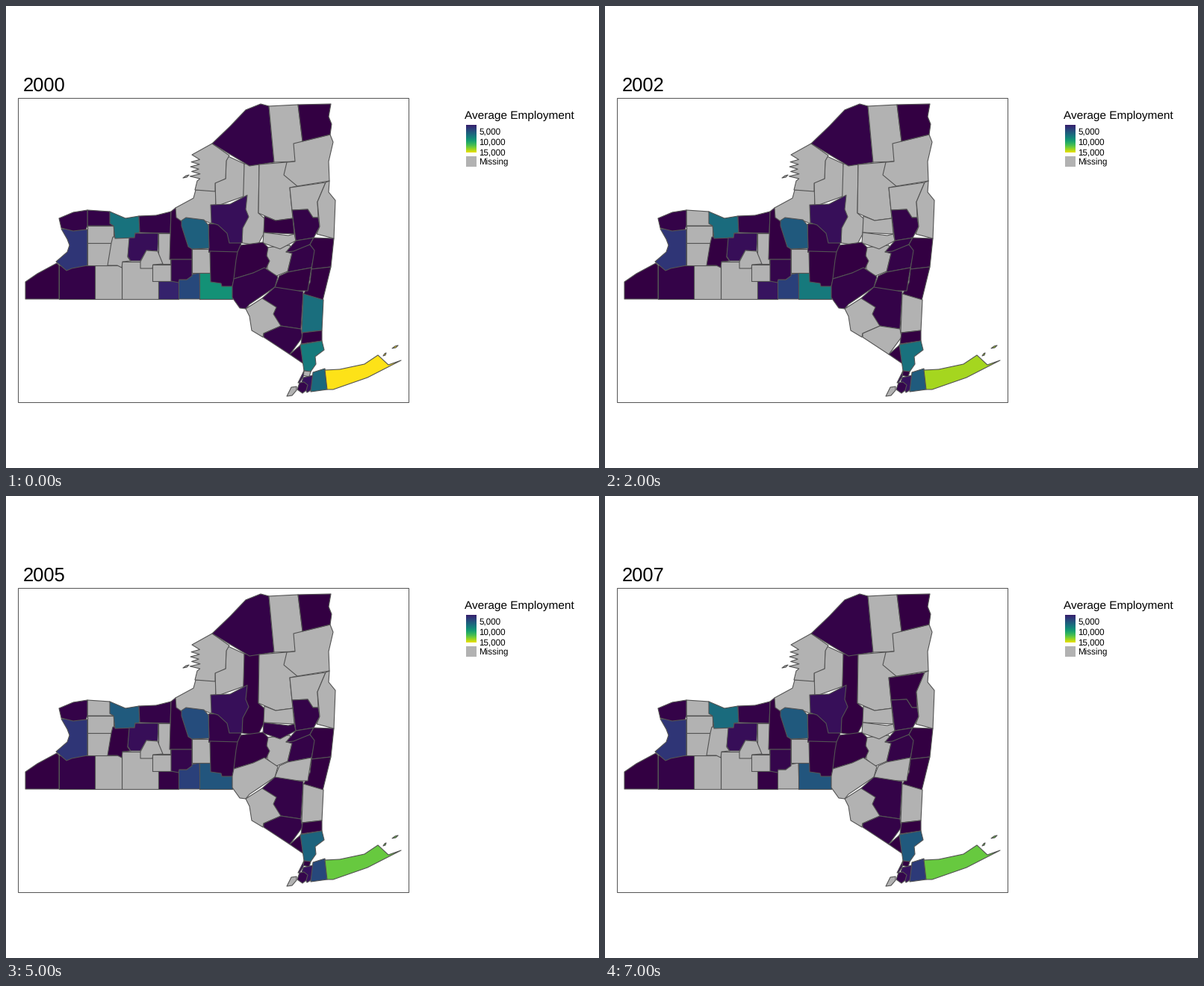
Recreate the animation shown at these times as a matplotlib script. Size 794 by 618 pixels, loop 8000 ms.

```python
import numpy as np
import matplotlib
import matplotlib.pyplot as plt
from matplotlib.animation import FuncAnimation
from matplotlib.patches import Polygon, Rectangle

W, H, DPI = 794, 618, 100
PX = 72 / DPI
YEARS = np.arange(2000, 2008)
MISSING, BORDER = "#b2b2b2", "#535353"
LOWEST, LOW = 0, .018

plt.rcParams["font.family"] = ["Liberation Sans", "DejaVu Sans"]
plt.rcParams["text.hinting"] = "none"

fig = plt.figure(figsize=(W / DPI, H / DPI), dpi=DPI, facecolor="white")
ax = fig.add_axes([0, 0, 1, 1])
ax.axis("off")

viridis = matplotlib.colormaps["viridis"]
rng = np.random.default_rng(4)
counties = []


def shade(t):
    """Viridis, slightly darkened; None means no data."""
    return MISSING if t is None else tuple(np.array(viridis(float(t))[:3]) ** 1.22)


def drift(a, b, first=2000, last=2007):
    """Level that moves evenly from a to b between two years."""
    return np.interp(YEARS, [first, last], [a, b])


def dip(mid, swing):
    """Level that sinks to its lowest in the middle of 2004 and recovers."""
    return mid + swing * np.cos(2 * np.pi * (YEARS - 2000.5) / 8)


def during(level, years):
    levels = np.broadcast_to(level, len(YEARS))
    return [t if y in years else None for t, y in zip(levels, YEARS)]


def since(first, last=2007):
    return range(first, last + 1)


def county(level, *xy):
    """Corner list, or a box from two corners; later counties cover earlier ones."""
    if len(xy) == 4:
        x0, y0, x1, y1 = xy
        xy = x0, y0, x1, y0, x1, y1, x0, y1
    levels = level if np.ndim(level) else [level] * len(YEARS)
    patch = Polygon(np.reshape(xy, (-1, 2)), closed=True, ec=BORDER,
                    lw=1.1 * PX, joinstyle="round")
    ax.add_patch(patch)
    counties.append((patch, [shade(t) for t in levels]))


def islet(level, x, y, r):
    county(level, x - r, y + 2, x, y - 1, x + r, y - 2, x + 1, y + 1)


def label(x, y, s, size):
    return ax.text(x, y, s, fontsize=size * PX, color="black")


# West
county(None, 155, 342, 204, 392)  # Steuben
county(None, 119, 347, 155, 392)  # Allegany
county(LOW, 71, 347, 119, 392)  # Cattaraugus
county(LOWEST, 26, 392, 26, 369, 42, 358, 68, 344, 71, 347, 71, 392)  # Chautauqua
county(None, 109, 317, 141, 347)  # Wyoming
county(None, 109, 294, 144, 317)  # Genesee
county(during(LOW, [2000]), 109, 273, 139, 275, 144, 294, 109, 294)  # Orleans
county(.21, 74, 298, 109, 299, 109, 347, 88, 351, 81, 354, 67, 342, 82, 329,
       85, 320, 82, 312)  # Erie
county(LOW, 71, 284, 90, 276, 109, 273, 109, 294, 107, 299, 90, 301, 74, 297)  # Niagara
county(during(LOWEST, since(2002, 2006)), 143, 309, 166, 309, 163, 336, 167, 341,
       156, 342, 155, 350, 149, 347, 136, 347, 141, 317)  # Livingston
county(dip(.4, .05), 139, 275, 160, 284, 178, 281, 179, 303, 173, 304, 172, 310,
       146, 311, 144, 294, 139, 291)  # Monroe
county(None, 204, 304, 220, 345)  # Seneca
county(.065, 173, 304, 204, 304, 203, 328, 188, 327, 180, 341, 167, 341, 163, 335,
       165, 310, 172, 310)  # Ontario
county(None, 180, 342, 188, 327, 203, 328, 210, 345, 197, 346, 196, 351, 180, 351)  # Yates
county(None, 196, 346, 222, 368)  # Schuyler
county(LOW, 178, 281, 201, 280, 221, 275, 220, 304, 179, 303)  # Wayne
county(LOWEST, 221, 275, 227, 270, 249, 300, 249, 339, 219, 339)  # Cayuga
county(during(drift(.285, .25, 2000, 2001), since(2000, 2006)),
       231, 366, 242, 366, 249, 359, 259, 357, 260, 392, 231, 392)  # Tioga
county(drift(.14, .01, 2000, 2005), 204, 368, 231, 392)  # Chemung
county(.03, 221, 339, 249, 339, 249, 361, 242, 366, 232, 366, 231, 370, 221, 368)  # Tompkins

# Centre and north
county(None, 249, 325, 274, 357)  # Cortland
county(drift(.57, .335, 2000, 2005), 259, 357, 303, 392)  # Broome
county(LOW, 271, 291, 314, 329)  # Madison
county(LOWEST, 273, 328, 314, 329, 303, 375, 289, 375, 288, 371, 274, 369)  # Chenango
county(None, 227, 270, 251, 257, 254, 246, 281, 247, 281, 263, 275, 291, 265, 287,
       235, 288, 228, 283)  # Oswego
county(dip(.335, .04), 235, 287, 241, 283, 265, 286, 271, 293, 272, 324, 249, 325,
       244, 322, 235, 294)  # Onondaga
county(None, 295, 200, 319, 211, 323, 253, 281, 268, 280, 236, 294, 231)  # Lewis
county(during(LOWEST, since(2005)), 319, 211, 339, 212, 338, 277, 347, 285,
       345, 305, 337, 320, 316, 317)  # Herkimer
county(.07, 274, 266, 300, 265, 323, 253, 321, 272, 325, 282, 317, 297, 316, 317,
       299, 317, 296, 304, 284, 293, 275, 290)  # Oneida

inlets = [(252 + (-1) ** k * rng.uniform(3, 8), 231 - 3.2 * k) for k in range(9)]
county(None, 276, 184, 299, 200, 295, 207, 294, 231, 280, 237, 280, 248, 253, 246,
       256, 234, *np.ravel(inlets), 249, 199)  # Jefferson
islet(None, 241, 228, 4)
county(LOW, 276, 184, 300, 161, 321, 139, 341, 131, 352, 134, 359, 209, 326, 214)  # St Lawrence
county(None, 352, 134, 391, 132, 397, 181, 387, 208, 359, 209)  # Franklin
county(None, 339, 212, 387, 208, 390, 241, 380, 243, 384, 284, 361, 287, 338, 277)  # Hamilton
county(None, 385, 184, 434, 172, 438, 182, 432, 208, 433, 234, 390, 241, 372, 226,
       376, 209, 387, 208)  # Essex
county(LOWEST, 391, 132, 435, 131, 432, 148, 436, 158, 434, 172, 397, 181)  # Clinton
county(during(LOWEST, [2004, 2007]), 380, 243, 428, 236, 417, 262, 418, 283,
       411, 283, 404, 272, 383, 273)  # Warren

# Capital and Hudson
county(LOW, 383, 273, 404, 272, 411, 283, 418, 283, 420, 295, 412, 310, 388, 314)  # Saratoga
county(None, 428, 236, 433, 234, 432, 249, 441, 260, 439, 311, 416, 305, 420, 295,
       417, 262)  # Washington
county(during(LOWEST, [2000]), 346, 281, 361, 287, 384, 284, 386, 305, 345, 303)  # Fulton
county(None, 349, 323, 380, 320, 383, 331, 377, 355, 360, 362, 350, 352)  # Schoharie
county(during(LOW, since(2003, 2006)), 345, 303, 378, 307, 386, 305, 388, 314,
       367, 325, 344, 317)  # Montgomery
county(LOW, 375, 329, 407, 319, 414, 327, 409, 350, 377, 356, 383, 331)  # Albany
county(LOW, 388, 314, 412, 310, 407, 319, 385, 328, 375, 329)  # Schenectady
county(LOWEST, 412, 310, 439, 311, 435, 349, 409, 352, 413, 327, 407, 319)  # Rensselaer
county(LOWEST, 409, 352, 435, 349, 424, 394, 398, 386, 407, 370)  # Columbia
county(during(LOWEST, since(2000, 2003)), 360, 376, 366, 361, 377, 356, 409, 350,
       404, 381, 374, 381)  # Greene
county(LOWEST, 314, 320, 344, 316, 351, 323, 349, 334, 353, 341, 348, 352, 305, 365,
       308, 340, 310, 329)  # Otsego
county(during(LOW, since(2000, 2004)), 303, 375, 305, 365, 331, 357, 346, 350,
       364, 362, 360, 376, 326, 399, 321, 405, 313, 404, 303, 390)  # Delaware
county(None, 321, 405, 343, 391, 368, 405, 368, 428, 345, 438, 344, 443, 329, 434,
       326, 415)  # Sullivan
county(LOW, 343, 391, 360, 376, 398, 382, 395, 432, 368, 428, 358, 412, 362, 403)  # Ulster
county(during(LOW, [2000, *since(2003)]), 345, 438, 368, 428, 395, 432, 397, 443,
       380, 466, 345, 443)  # Orange
county(LOWEST, 380, 466, 395, 453, 399, 479)  # Rockland
county(during(drift(.43, .53, 2000, 2001), since(2000, 2001)),
       398, 385, 425, 393, 423, 434, 396, 437)  # Dutchess
county(LOWEST, 397, 437, 423, 434, 423, 448, 395, 452)  # Putnam
county(drift(.48, .35), 394, 453, 423, 448, 426, 460, 414, 469, 415, 479, 408, 489,
       399, 488)  # Westchester

# Downstate
county(during(LOWEST, since(2002)), 399, 488, 408, 489, 406, 496, 397, 494)  # Bronx
county(.06, 399, 488, 398, 496, 393, 504, 391, 504)  # Manhattan
county(.08, 398, 497, 411, 494, 411, 504, 408, 514, 403, 517, 396, 503)  # Queens
county(.03, 393, 504, 399, 503, 404, 507, 402, 514, 397, 518, 390, 513)  # Kings
county(None, 376, 522, 382, 510, 389, 509, 389, 514, 383, 521)  # Richmond
county(drift(.41, .23), 411, 490, 427, 485, 430, 513, 408, 516)  # Nassau
suffolk = drift(1, .8, 2000.8, 2002.9)
county(suffolk, 427, 487, 447, 486, 480, 479, 498, 467, 512, 480, 529, 474,
       484, 497, 438, 513, 430, 513)
islet(suffolk, 521, 456, 4)
islet(suffolk, 507, 466, 2)

ax.add_patch(Rectangle((16, 123), 523, 407, fill=False, ec="#555555", lw=PX))
title = label(22.5, 114, "", 25.5)

# Legend
label(614.5, 151, "Average Employment", 15.4)
ramp = [[shade(t)] for t in np.linspace(.134, .965, 37)]
ax.imshow(ramp, extent=(616, 630, 196, 159), aspect="auto", interpolation="nearest")
ax.add_patch(Rectangle((616, 201), 14, 14, fc=MISSING, lw=0))
for k, s in enumerate(["5,000", "10,000", "15,000", "Missing"]):
    label(633.5, 171 + 14 * k, s, 11.6)

ax.set_xlim(0, W)
ax.set_ylim(H, 0)


def draw(i):
    title.set_text(str(YEARS[i]))
    for patch, fills in counties:
        patch.set_facecolor(fills[i])
    return [title] + [patch for patch, _ in counties]


anim = FuncAnimation(fig, draw, frames=len(YEARS), interval=1000,
                     repeat=True, repeat_delay=0, blit=False)
plt.show()
```
